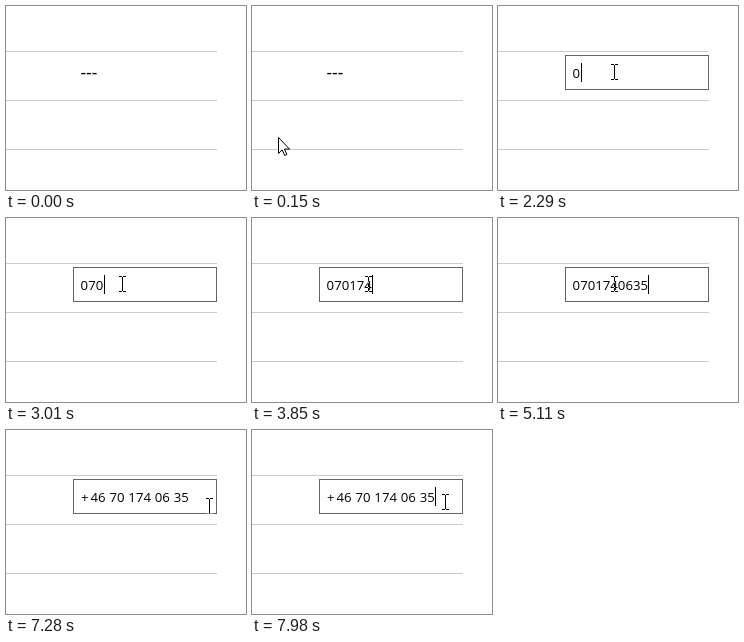
Write an HTML page that moves like this. It is 240 by 184 pixels and loops after 8 s.

```html
<!DOCTYPE html>
<html lang="en">
<head>
<meta charset="utf-8">
<title>Phone field</title>
<style>
  html, body { margin: 0; width: 100%; height: 100%; overflow: hidden; background: #fff; }
  svg { display: block; width: 240px; height: 184px; isolation: isolate; }
  text { font: 500 13.2px "Open Sans", "Noto Sans", sans-serif; fill: #000; }
  #empty { font-size: 17.4px; }
  #phone { word-spacing: .4px; }
  #beam { fill: #fff; mix-blend-mode: difference; }
  .rule { fill: #cbcbcb; }
</style>
</head>
<body>
<svg viewBox="0 0 240 184">
  <rect width="240" height="184" fill="#fff"/>
  <rect class="rule" y="45" width="211" height="1"/>
  <rect class="rule" y="94" width="211" height="1"/>
  <rect class="rule" y="143" width="211" height="1"/>
  <rect id="box" x="67.5" y="49.5" width="143" height="34" fill="#fff" stroke="#646464"/>
  <text id="empty" x="74.5" y="73">---</text>
  <text id="typed" x="74.6" y="72"></text>
  <text id="phone" x="75" y="72">+<tspan dx="2">46 70 174 06 35</tspan></text>
  <rect id="caret" y="57" width="1" height="19"/>
  <path id="beam" d="M0 0h3v1h-3zM4 0h3v1h-3zM3 1h1v14h-1zM0 15h3v1h-3zM4 15h3v1h-3z"/>
  <path id="arrow" d="M.5.5v16l3.7-3.6 2.5 5.6 2.2-1-2.5-5.4h5.1z" fill="#fff" stroke="#000"/>
</svg>
<script>
const LOOP = 8000;
const DIGITS = "0701740635";
const $ = id => document.getElementById(id);
const [box, empty, typed, phone, caret, beam, arrow] =
  ["box", "empty", "typed", "phone", "caret", "beam", "arrow"].map($);

const KEYS = [2290, 2610, 3010, 3310, 3540, 3850, 4250, 4550, 4880, 5110];
const CLEAR = 850, COMMIT = 6360;

// [time, visible]
const BOX = [[0, 0], [300, 1], [COMMIT, 0], [7130, 1]];
const CARET = [[0, 0], [CLEAR, 1], [1300, 0], [1830, 1], [5660, 0], [6190, 1], [COMMIT, 0], [7890, 1]];

// [time, pointer shape, x, y]
const POINTER = [
  [0, null],
  [70, arrow, -2, 163], [150, arrow, 26, 131], [220, arrow, 52, 102],
  [300, beam, 78, 66], [370, beam, 100, 61], [450, beam, 113, 58],
  [5890, null],
  [6970, arrow, 232, 104], [7050, arrow, 220, 91], [7130, beam, 204, 68],
  [7210, beam, 200, 68], [7290, beam, 198, 67], [7360, beam, 196, 67],
  [7890, beam, 193, 65], [7980, beam, 190, 64]
];

const at = (steps, t) => steps.findLast(s => s[0] <= t);
const show = (el, on) => el.style.display = on ? "" : "none";

function draw(t) {
  const count = KEYS.filter(k => k <= t).length;
  const done = t >= COMMIT;

  show(box, at(BOX, t)[1]);
  show(empty, t < CLEAR);
  show(typed, !done);
  show(phone, done);
  typed.textContent = DIGITS.slice(0, count);

  show(caret, at(CARET, t)[1]);
  caret.setAttribute("x", done ? 183 : Math.round(75 + 7.54 * count));

  const [, shape, x, y] = at(POINTER, t);
  for (const p of [beam, arrow]) show(p, p === shape);
  if (shape) shape.setAttribute("transform", `translate(${x} ${y})`);
}

const start = performance.now();
function tick() {
  draw((performance.now() - start) % LOOP);
  requestAnimationFrame(tick);
}
tick();
</script>
</body>
</html>
```
